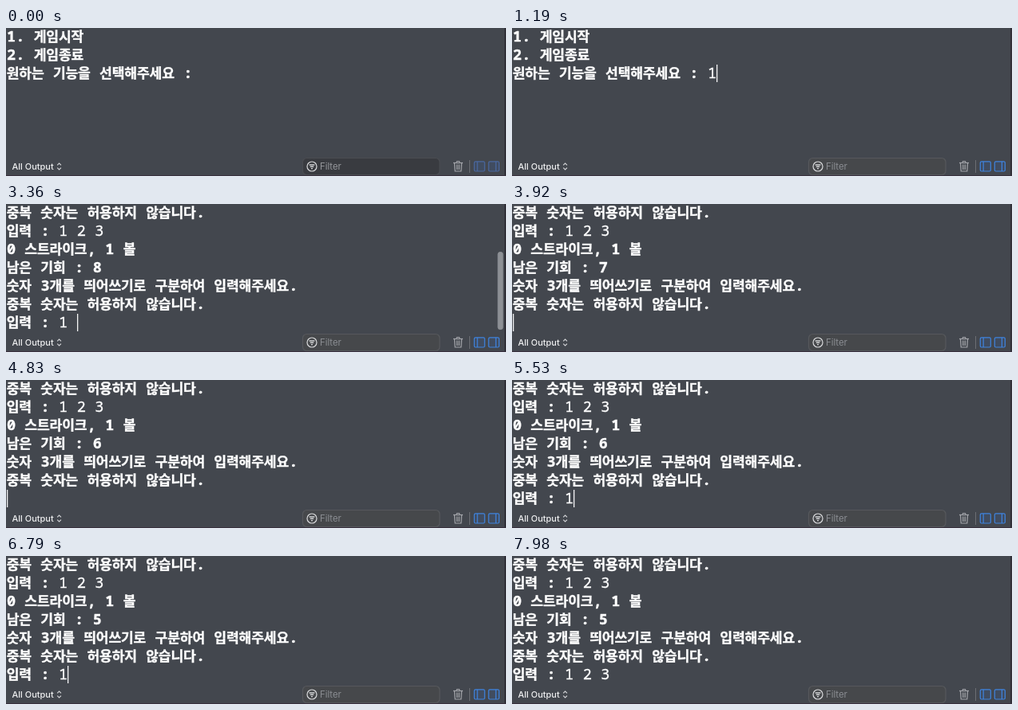
Animation of 626x186 px, one loop 8 s. Source, as an HTML page with a canvas:

```html
<!DOCTYPE html>
<html lang="ko">
<head>
<meta charset="utf-8">
<title>Console game</title>
<style>
  html, body { margin: 0; width: 100%; height: 100%; overflow: hidden; background: #43474e; }
  canvas { display: block; }
</style>
</head>
<body>
<canvas id="stage" width="626" height="186"></canvas>
<script>
const ctx = document.getElementById('stage').getContext('2d');
const LOOP = 8000, TICK = 70;
const ROW = 23, ROWS = 7, LEFT = 0.8, BASE = 16.6;
const HANGUL = 15.62, LATIN = 11.32;
const MID = 174; // centre line of the bottom bar

const MENU = ['1. 게임시작', '2. 게임종료'];
const ASK = '원하는 기능을 선택해주세요 : ';
const RULES = ['숫자 3개를 띄어쓰기로 구분하여 입력해주세요.', '중복 숫자는 허용하지 않습니다.'];
const PROMPT = '입력 : ';
const GUESS = '1 2 3';

const FOCUS = 560, PICK = 1120, PICK_ENTER = PICK + 2 * TICK;
// First key and enter of each round
const ROUNDS = [[2100, 2870], [3150, 3850], [4270, 4760], [5250, 6510], [6790, LOOP]];

const clamp = v => Math.max(0, Math.min(1, v));

// Typing speeds up a little towards enter
function typedKeys(t, first, enter) {
  if (t < first) return 0;
  const p = clamp((t - first) / (enter - first)) ** 1.25;
  return Math.min(GUESS.length, 1 + Math.floor(p * GUESS.length));
}

// Console content at time t, as lines of { out, typed }
function consoleLines(t) {
  const lines = [];
  const print = (out, typed = '') => lines.push({ out, typed });
  MENU.forEach(s => print(s));
  print(ASK, t >= PICK ? '1' : '');
  if (t < PICK_ENTER) return lines;
  if (t >= PICK_ENTER + TICK) RULES.forEach(s => print(s));
  print(t >= PICK_ENTER + 3 * TICK ? PROMPT : '');

  ROUNDS.forEach(([first, enter], i) => {
    if (t < first) return;
    lines[lines.length - 1].typed = GUESS.slice(0, typedKeys(t, first, enter));
    if (t < enter) return;
    if (t >= enter + TICK) {
      print('0 스트라이크, 1 볼');
      print('남은 기회 : ' + (8 - i));
      RULES.forEach(s => print(s));
    }
    print(t >= enter + 2 * TICK ? PROMPT : '');
  });
  return lines;
}

function drawCells(text, x, y, weight) {
  ctx.fillStyle = ctx.strokeStyle = '#fff';
  ctx.lineWidth = 0.35;
  ctx.textAlign = 'center';
  for (const ch of text) {
    const wide = ch >= '가' && ch <= '힣';
    const w = wide ? HANGUL : LATIN;
    ctx.font = wide
      ? `${weight} 17.2px "Noto Sans CJK KR", "Noto Sans CJK", sans-serif`
      : `${weight} 18.6px "Noto Sans Mono", "DejaVu Sans Mono", monospace`;
    ctx.fillText(ch, x + w / 2, y);
    ctx.strokeText(ch, x + w / 2, y);
    x += w;
  }
  return x;
}

function drawConsole(t) {
  const lines = consoleLines(t).slice(-ROWS);
  let end = 0;
  lines.forEach(({ out, typed }, i) => {
    const y = BASE + ROW * i;
    end = drawCells(typed, drawCells(out, LEFT, y, 700), y, 400);
  });
  ctx.globalAlpha = t < FOCUS ? 0 : clamp((LOOP - 20 - t) / 140);
  ctx.fillStyle = '#f4f4f5';
  ctx.fillRect(Math.round(end), ROW * (lines.length - 1), 1.3, ROW - 1);
  ctx.globalAlpha = 1;
}

function drawScrollbar(t) {
  const shown = ROUNDS[0][1] + TICK, gone = shown + 10 * TICK;
  if (t < shown) return;
  ctx.globalAlpha = clamp((gone - t) / 140);
  box(615.5, 60, 7, 98, 3.5, '#8d9095');
  ctx.globalAlpha = 1;
}

function box(x, y, w, h, r, fill, edge) {
  ctx.beginPath();
  ctx.roundRect(x, y, w, h, r);
  ctx.fillStyle = fill;
  ctx.fill();
  if (!edge) return;
  ctx.strokeStyle = edge;
  ctx.lineWidth = 1.2;
  ctx.stroke();
}

function line(color, width, ...points) {
  ctx.strokeStyle = color;
  ctx.lineWidth = width;
  ctx.beginPath();
  points.forEach(p => ctx.lineTo(...p));
  ctx.stroke();
}

function label(text, x, size, color, weight) {
  ctx.font = `${weight} ${size}px Inter, "Liberation Sans", sans-serif`;
  ctx.textAlign = 'left';
  ctx.fillStyle = color;
  ctx.fillText(text, x, MID + 4);
}

function drawChevrons(x) {
  for (const dir of [-1, 1]) {
    const y = MID + dir * 1.6;
    line('#d5d6d9', 1.1, [x - 2.4, y], [x, y + dir * 2.4], [x + 2.4, y]);
  }
}

function drawFilter(active) {
  box(371.5, 163.5, 171.5, 21, 5, active ? '#46484b' : '#393b40', active ? '#56585c' : '#4a4c51');
  const x = 383, white = '#d9dadc';
  box(x - 6, MID - 6, 12, 12, 6, 'transparent', white);
  for (let i = 0; i < 3; i++) {
    const half = 3.4 - i * 1.2, y = MID - 2 + i * 2.3;
    line(white, 1.4, [x - half, y], [x + half, y]);
  }
  label('Filter', 393, 11.3, active ? '#8b8e93' : '#96989c', 400);
}

function drawTrash(x) {
  const grey = '#a3a5aa', top = MID - 4.5, foot = MID + 6;
  line(grey, 1.2, [x - 6, top], [x + 6, top]);
  line(grey, 1.1, [x - 2, top], [x - 1.6, top - 2], [x + 1.6, top - 2], [x + 2, top]);
  line(grey, 1.2, [x - 4.6, top], [x - 3.8, foot], [x + 3.8, foot], [x + 4.6, top]);
  for (const dx of [-1.8, 0, 1.8]) line(grey, 0.9, [x + dx, top + 2], [x + dx * 0.85, foot - 2]);
}

function drawPane(x, side, color) {
  const bar = x + side * 2.6;
  box(x - 6.5, MID - 6.2, 13, 12.2, 1.5, 'rgba(45, 105, 200, 0.15)', color);
  line(color, 1.2, [bar, MID - 6], [bar, MID + 6]);
}

function drawBar(active) {
  label('All Output', 7.5, 11, '#eeeff0', 500);
  drawChevrons(66.6);
  drawFilter(active);
  drawTrash(566);
  line('#6b6e74', 1, [580.5, MID - 8], [580.5, MID + 8]);
  const blue = active ? '#3f83de' : '#4a68a0';
  for (const side of [-1, 1]) drawPane(601.8 + side * 9, side, blue);
}

function draw(t) {
  ctx.fillStyle = '#43474e';
  ctx.fillRect(0, 0, 626, 186);
  drawConsole(t);
  drawScrollbar(t);
  drawBar(t >= FOCUS);
  ctx.fillStyle = '#302f37';
  ctx.fillRect(624, 0, 2, 186);
  ctx.fillStyle = '#382f3d';
  ctx.fillRect(0, 185, 626, 1);
}

const start = performance.now();
function tick() {
  draw((performance.now() - start) % LOOP);
  requestAnimationFrame(tick);
}
tick();
</script>
</body>
</html>
```
